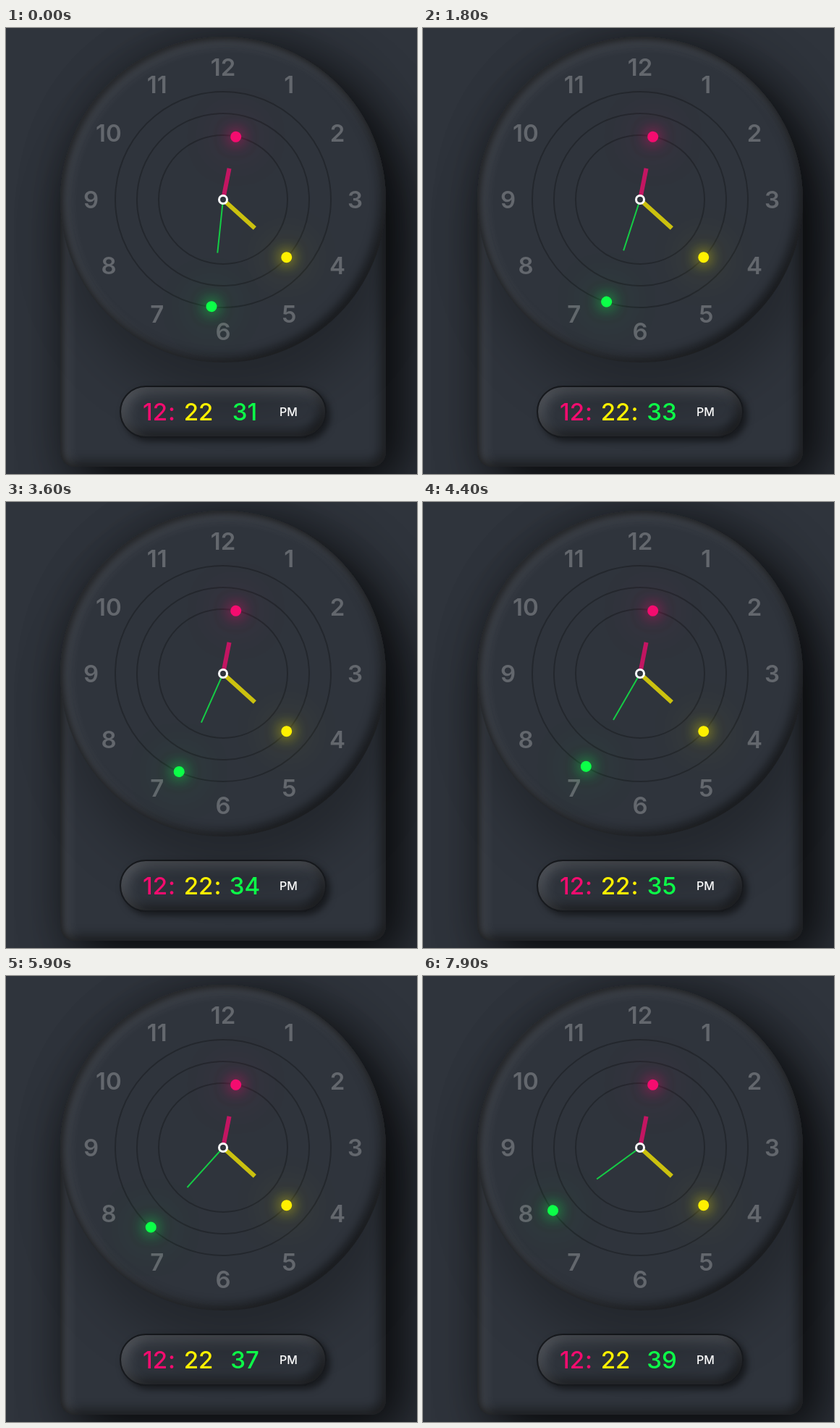
An HTML page for the animation above (8000 ms loop, 568x616 px).

```html
<!DOCTYPE html>
<html lang="en">
<head>
<meta charset="utf-8">
<title>Neumorphic clock</title>
<style>
  * { box-sizing: border-box; }
  html, body { margin: 0; width: 100%; height: 100%; overflow: hidden; }
  body {
    --base: #2f343c;
    --pink: #f40c6f;
    --yellow: #fff000;
    --green: #0cff48;
    position: relative;
    background: var(--base);
    font: 600 33px/1 Inter, sans-serif;
  }
  .case, .dial, .pill, .ring, .mark, .pivot { position: absolute; }
  .case {
    left: 75px; top: 12px; width: 450px; height: 594px;
    border-radius: 225px 225px 20px 20px;
    background: var(--base);
    box-shadow:
      25px 25px 75px rgba(0, 0, 0, .75),
      10px 10px 70px rgba(0, 0, 0, .25),
      inset 5px 5px 10px rgba(0, 0, 0, .5),
      inset 5px 5px 20px rgba(255, 255, 255, .2),
      inset -5px -5px 15px rgba(0, 0, 0, .75);
  }
  .dial {
    left: 0; top: 0; width: 450px; height: 450px;
    border-radius: 50%;
    background: var(--base);
    box-shadow:
      10px 50px 70px rgba(0, 0, 0, .25),
      inset 5px 5px 10px rgba(0, 0, 0, .5),
      inset 5px 5px 20px rgba(255, 255, 255, .2),
      inset -5px -5px 15px rgba(0, 0, 0, .75);
  }
  .mark { transform: translate(-50%, -50%); white-space: nowrap; }
  .numeral { color: rgba(255, 255, 255, .25); }
  .ring {
    left: 225px; top: 225px;
    width: var(--size); height: var(--size);
    margin: calc(var(--size) / -2);
    border: 2px solid rgba(0, 0, 0, .25);
    border-radius: 50%;
    transform: rotate(var(--angle));
  }
  .ring::before {
    content: "";
    position: absolute;
    left: 50%; top: -8.5px; width: 15px; height: 15px;
    margin-left: -7.5px;
    border-radius: 50%;
    background: var(--color);
    box-shadow: 0 0 20px var(--color), 0 0 60px var(--color);
    clip-path: none;
  }
  .ring::after {
    content: "";
    position: absolute;
    left: 50%; bottom: 50%; height: 25%;
    width: var(--hand);
    margin-left: calc(var(--hand) / -2);
    background: var(--color);
    opacity: .75;
  }
  .hours { --size: 180px; --hand: 6px; --color: var(--pink); --angle: 11.2deg; }
  .minutes { --size: 240px; --hand: 6px; --color: var(--yellow); --angle: 132deg; }
  .seconds { --size: 300px; --hand: 2px; --color: var(--green); }
  .pivot {
    left: 218px; top: 218px; width: 14px; height: 14px;
    border: 3px solid #fff; border-radius: 50%;
    background: var(--base);
  }
  .pill {
    left: 82px; top: 482px; width: 286px; height: 72px;
    border: 2px solid rgba(0, 0, 0, .5);
    border-radius: 40px;
    box-shadow:
      5px 5px 10px rgba(0, 0, 0, .5),
      inset 5px 5px 20px rgba(255, 255, 255, .2),
      inset -5px -5px 15px rgba(0, 0, 0, .75);
  }
  .digit { top: 518px; font-weight: 500; }
</style>
</head>
<body>
<div class="case">
  <div class="dial" id="dial">
    <div class="ring seconds" id="seconds"></div>
    <div class="ring minutes"></div>
    <div class="ring hours"></div>
    <div class="pivot"></div>
  </div>
  <div class="pill"></div>
  <div class="mark digit" style="left:131px;color:var(--pink)">12</div>
  <div class="mark digit" style="left:154px;color:var(--pink)">:</div>
  <div class="mark digit" style="left:191px;color:var(--yellow)">22</div>
  <div class="mark digit" style="left:217.5px;color:var(--yellow)" id="colon">:</div>
  <div class="mark digit" style="left:255px;color:var(--green)" id="count">31</div>
  <div class="mark digit" style="left:315.5px;color:#fff;font-size:16px">PM</div>
</div>
<script>
  const LOOP = 8000;
  const TICKS = [800, 1700, 2800, 3800, 4700, 5800, 6700, 7800];
  const COLON_ON = [400, 1300, 2400, 3400, 4400, 5400, 6400, 7400];
  const COLON_OFF = [900, 1900, 3000, 3900, 4900, 5900, 6900, 7900];

  const find = id => document.getElementById(id);
  const dial = find("dial"), ring = find("seconds");
  const colon = find("colon"), count = find("count");
  const passed = (times, now) => times.filter(t => t <= now).length;

  for (let hour = 12; hour >= 1; hour--) {
    const angle = hour * Math.PI / 6;
    const numeral = document.createElement("div");
    numeral.className = "mark numeral";
    numeral.textContent = hour;
    numeral.style.left = 225 + 182.5 * Math.sin(angle) + "px";
    numeral.style.top = 224.5 - 182.5 * Math.cos(angle) + "px";
    dial.prepend(numeral);
  }

  const start = performance.now();
  function draw() {
    const now = (performance.now() - start) % LOOP;
    const second = 31 + passed(TICKS, now);
    ring.style.setProperty("--angle", second * 6 + "deg");
    count.textContent = second;
    const lit = passed(COLON_ON, now) > passed(COLON_OFF, now);
    colon.style.visibility = lit ? "visible" : "hidden";
    requestAnimationFrame(draw);
  }
  draw();
</script>
</body>
</html>
```
